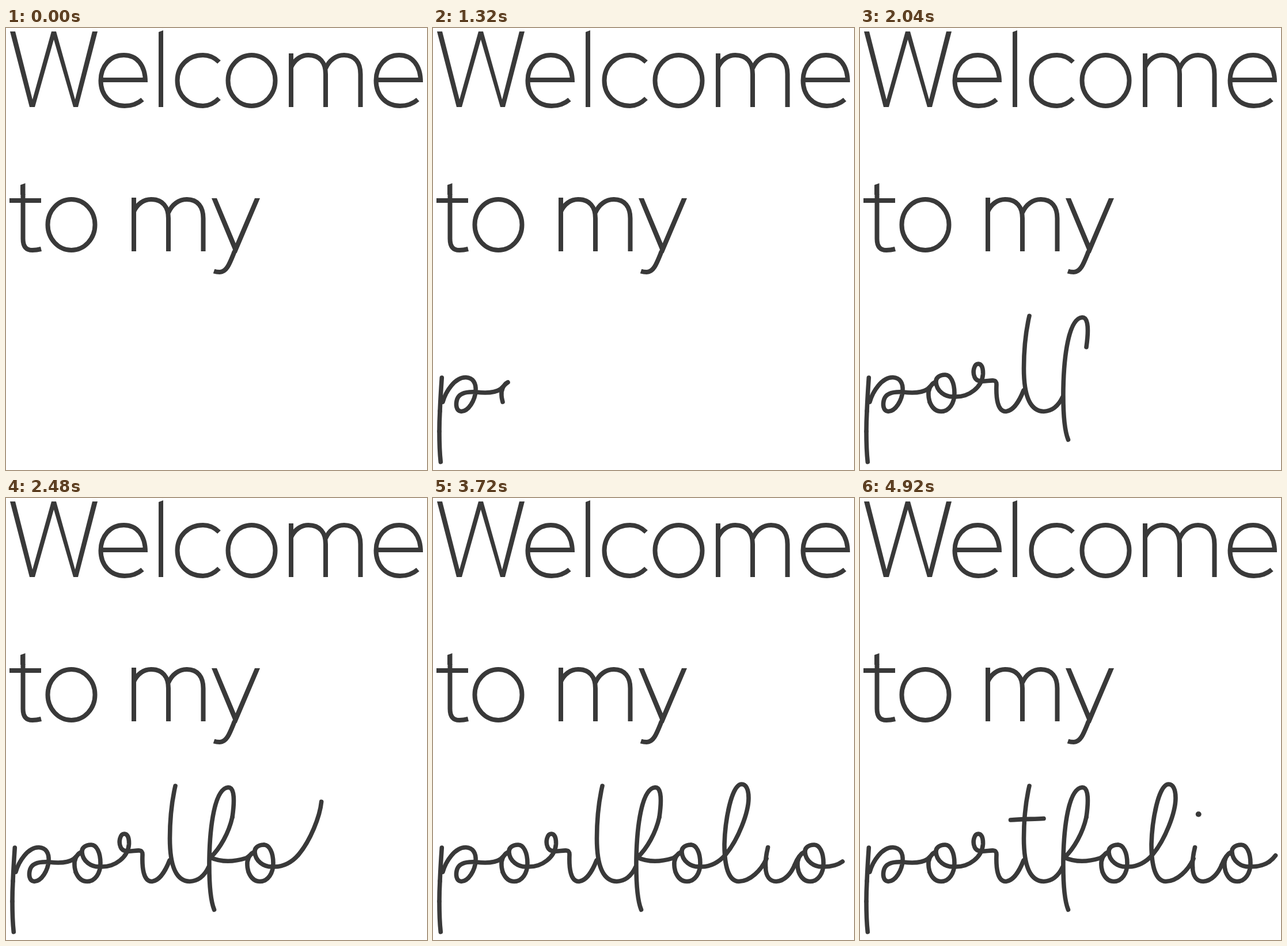
Write an HTML page that moves like this. It is 731 px wide and 766 px high and loops after 4.96 s.

```html
<!DOCTYPE html>
<html lang="en">
<head>
<meta charset="utf-8">
<title>Welcome to my portfolio</title>
<style>
  html, body { margin: 0; width: 100%; height: 100%; overflow: hidden; background: #fff; }
  svg { display: block; width: 731px; height: 766px; }
  path, ellipse { fill: none; stroke: #393939; stroke-width: 8; }
  .solid { fill: #393939; stroke: none; }
  #pen path { stroke-width: 7.6; stroke-linecap: round; stroke-linejoin: round; }
</style>
</head>
<body>
<svg viewBox="0 0 731 766" role="img" aria-label="Welcome to my portfolio">
  <defs>
    <path id="e" d="M165 90H245M242 94C242 64 227 47 204.500 47C181 47 164.500 66 164.500 91C164.500 117 182 135 206 135C219 135 229 131 237 124"/>
    <ellipse id="o" cx="426.500" cy="91" rx="41" ry="44"/>
    <path id="m" d="M495 44V137M495 68C501 55 512 47 525 47C545 47 555 60 555 80V137M555 70C561 56 573 47 587 47C606 47 615.500 60 615.500 80V137"/>
  </defs>
  <g id="welcome">
    <path class="solid" d="M7 6h9L46 124 79 6h8L120 124 150 6h9L125 137h-8L83 20 50 137h-9z"/>
    <use href="#e"/>
    <path class="solid" d="M265 7l8-3v133h-8z"/>
    <path d="M370 59C362 51 353 47 342 47C316 47 297.500 66 297.500 91C297.500 116 316 135 342 135C353 135 362 130 370 122"/>
    <use href="#o"/>
    <use href="#m"/>
    <use href="#e" x="478"/>
  </g>
  <g id="to-my">
    <path class="solid" d="M25 272l8.500-3v20h-8.500z"/>
    <path d="M6 299H61M29.500 288V365C29.500 379 35 385 46 385C52 385 57 384 61 383"/>
    <use href="#o" x="-313" y="250"/>
    <use href="#m" x="-273" y="250"/>
    <path class="solid" d="M357 295h9L398.700 373 432 295h9L400.600 390h-9L394 384z"/>
    <path d="M396.500 388C388 409 383 423 371 423C367 423 364 422.500 361 421.500"/>
  </g>
  <g id="pen"></g>
</svg>
<script>
const LOOP = 4960, STEP = 40, START = 60;

// The script letter o, relative to its entry point at the upper left.
const oSide = 'c-8 4-12 14-11 23c0 4 1 7 2 11';
const oBowl = 'c4 10 10 16.5 20 16.5c14 0 23-14.5 23-31.5c0-19-7-32-16-32';
const oExit = 'c-11 0-17 6-16 13c1 15 15 26 32 25';

// Pen strokes in writing order; a number is the time the pen finishes that stroke.
const strokes = [
  ['M15.3 606C14 625 12.8 645 12 664', 600],
  ['M12 664C11.3 677 11 689 11 699', 720],
  ['M11 699C11 720 12 740 13.3 752'],
  ['M17 648C22 630 38 605 57 605.5C70 606 75 616 74 629C73 645 62 664 49 664.5C40 664 39 652 42 643C46 632 60 630 75 631', 1160],
  ['M75 631C92 633 108 632 117 626C122 622 126 616 130 614' + oSide, 1320],
  ['M121 648' + oBowl + oExit],
  ['M164 639C190 640 212 622 213.5 600C214 587 210 582 205.5 582C198 582 195 596 199 605C204 617 222 610 232 611C236 611.5 237 613 237 618C236 642 239 664 252.5 664.5C266 664 277 646 284 628', 1700],
  ['M294 499C288 525 284.5 560 284.5 590C284.5 640 297 664 319 664.5C334 664 345 654 352 639'],
  ['M361.5 713.5C354 695 352.5 660 353 625C354 570 362 503 386 501.5C397 501.5 397 525 393 553', 2040],
  ['M393 553C387 580 372 607 355 623C375 632 398 630 417 624C422 622 426 616 430 614' + oSide + oBowl, 2280],
  ['M448 601' + oExit],
  ['M464 639C482 640 498 630 508 618C530 592 548 545 548 520C548 504 543 496 536 496C518 496 507 560 506 600C506 640 514 664 531 664.5C551 664 570 645 579 625'],
  ['M581.5 605.5C578 620 577 632 577.5 640', 2840],
  ['M577.5 640C578 656 585 664.5 596 664.5C611 664 622 650 628 636', 3000],
  ['M628 636C632 626 638 617 644 614' + oSide + oBowl + oExit],
  ['M678 639C692 639 703 636 711 630', 3720],
  ['M711 630C715 627 719 623 721.5 619.5', 3960],
  ['M261.5 558C280 556.5 300 556.5 319 555.5', 4560],
  ['M587.5 548h.5', 4760]
];

const pen = document.getElementById('pen');
const keys = [[START, 0]];
let total = 0;
const parts = strokes.map(([d, end]) => {
  const path = document.createElementNS(pen.namespaceURI, 'path');
  path.setAttribute('d', d);
  pen.append(path);
  const length = path.getTotalLength();
  const part = { path, length, from: total };
  total += length;
  if (end) keys.push([end, total]);
  return part;
});
parts.at(-1).path.style.strokeWidth = '9.5px';

const slopes = keys.slice(1).map(([t, s], i) => (s - keys[i][1]) / (t - keys[i][0]));
const tangents = keys.map((_, i) => {
  const a = slopes[i - 1], b = slopes[i];
  return a && b ? 2 * a * b / (a + b) : 0;
});

// Smooth, never reversing distance travelled by the pen.
function distance(t) {
  if (t <= START) return 0;
  const i = keys.findIndex(key => key[0] > t) - 1;
  if (i < 0) return total;
  const [t0, s0] = keys[i], [t1, s1] = keys[i + 1];
  const h = t1 - t0, u = (t - t0) / h, v = 1 - u;
  return s0 * v * v * (1 + 2 * u) + s1 * u * u * (3 - 2 * u)
    + h * u * v * (tangents[i] * v - tangents[i + 1] * u);
}

function draw(now) {
  const time = Math.floor(now % LOOP / STEP) * STEP;
  const inked = distance(time);
  for (const { path, length, from } of parts) {
    const drawn = Math.min(inked - from, length);
    path.style.visibility = drawn > 0 ? 'visible' : 'hidden';
    path.style.strokeDasharray = drawn < length ? `${Math.max(drawn, 0)} ${length + 20}` : 'none';
  }
}

const origin = performance.now();
function tick() {
  draw(performance.now() - origin);
  requestAnimationFrame(tick);
}
tick();
</script>
</body>
</html>
```
